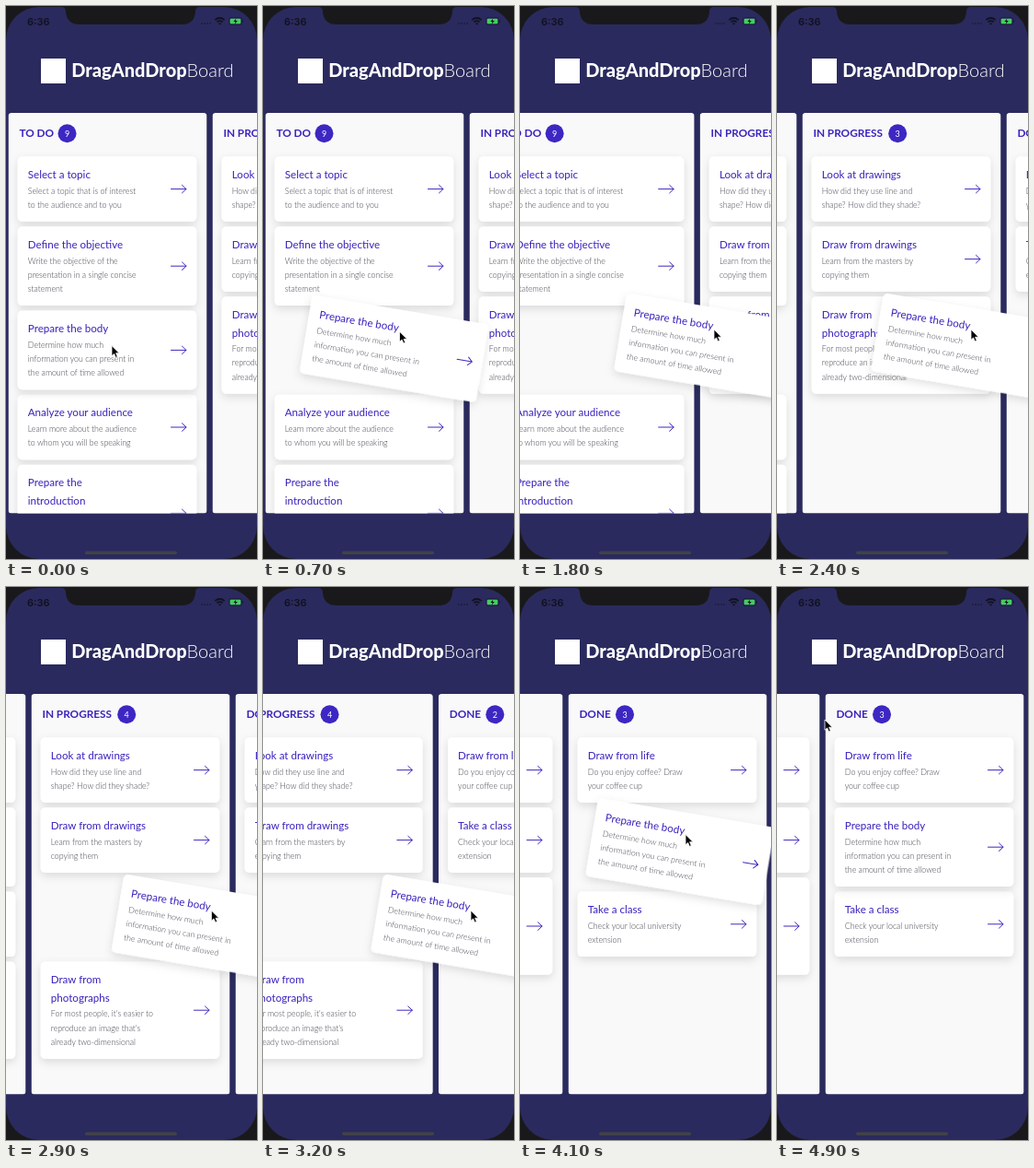
These frames come from a looping animation (273 by 600 pixels, 5000 ms). An HTML page:

```html
<!DOCTYPE html>
<html lang="en">
<head>
<meta charset="utf-8">
<title>Drag and drop board</title>
<style>
  html, body { margin: 0; width: 100%; height: 100%; overflow: hidden; background: #1a1a1c; }
  svg { display: block; width: 100vw; height: 100vh; font-family: Lato, "Open Sans", sans-serif; }
  .brand { font-size: 20px; font-weight: 800; fill: #fff; }
  .brand tspan { font-weight: 300; }
  .head { font-size: 11.8px; font-weight: 700; fill: #3a25bd; }
  .count { font-size: 9px; fill: #fff; text-anchor: middle; }
  .title { font-size: 11.6px; fill: #3a22bd; }
  .desc { font-size: 8.8px; font-weight: 300; fill: #464452; }
  .arrow { fill: none; stroke: #3f28bf; stroke-width: 1; stroke-linecap: round; stroke-linejoin: round; }
  .clock { font: 600 11px Inter, sans-serif; fill: #11111f; }
</style>
</head>
<body>
<svg id="stage" viewBox="0 0 273 600" preserveAspectRatio="none">
  <defs>
    <filter id="soft" x="-20%" y="-30%" width="140%" height="170%">
      <feDropShadow dx="0" dy="3.5" stdDeviation="4.6" flood-color="#000" flood-opacity=".12"/>
    </filter>
    <clipPath id="colClip"><rect y="116" width="216" height="434.5" rx="3"/></clipPath>
  </defs>
  <rect width="273" height="600" fill="#2a2a5e"/>
  <rect x="38" y="57" width="27" height="27" fill="#fff"/>
  <text class="brand" x="71.3" y="76.8">DragAndDrop<tspan>Board</tspan></text>
  <g id="board"></g>
  <g id="held"></g>
  <g id="phone">
    <path fill="#19191b" fill-rule="evenodd" d="M0 0H273V600H0ZM0 37A36 36 0 0 1 36 1H237A36 36 0 0 1 273 37V564A36 36 0 0 1 237 600H36A36 36 0 0 1 0 564Z"/>
    <path fill="#19191b" d="M60 0V1Q65 1 65 6Q66 20 80 20H191Q205 20 206 6Q206 1 211 1V0Z"/>
    <text class="clock" x="23" y="20.5">6:36</text>
    <g fill="#15152c">
      <circle cx="213" cy="19" r=".8"/><circle cx="216" cy="19" r=".8"/>
      <circle cx="219" cy="19" r=".8"/><circle cx="222" cy="19" r=".8"/>
    </g>
    <g fill="none" stroke="#11111f" stroke-width="1.7">
      <path d="M227.4 15.2Q232.5 10.8 237.6 15.2M229.4 17.4Q232.5 14.8 235.6 17.4"/>
      <path d="M231.4 19.3H233.6"/>
    </g>
    <rect x="242.5" y="12.5" width="14" height="8" rx="2.2" fill="none" stroke="#1c1c3c" stroke-width=".7"/>
    <rect x="243.7" y="13.7" width="11.6" height="5.6" rx="1.2" fill="#43cf5c"/>
    <path d="M250.4 13.4L247.4 17H249.4L248.7 19.7L251.8 16.1H249.7Z" fill="#11111f"/>
    <path d="M257.6 15.2V17.8" stroke="#1c1c3c" stroke-width="1"/>
    <rect x="86" y="591.5" width="100" height="3.4" rx="1.7" fill="#424249"/>
  </g>
  <path id="cursor" d="M0 0V11.2L2.6 8.9L4.4 12.9L6.3 12.1L4.6 8.2H8.2Z" fill="#000" stroke="#fff" stroke-width=".8" stroke-linejoin="round"/>
</svg>
<script>
const LOOP = 5000, STEP = 100;
const CARD_W = 194.5, CARD_X = 10.2, FIRST_Y = 163.3, GAP = 5.4;
const COL_X = 2.5, COL_STEP = 222, PAGE = 197, TILT = 9.5;
const GRIP = { x: -6, y: 18.7 };

// Each card: title lines, then description lines.
const columns = [
  { name: "TO DO", badge: 64, count: 8, cards: [
    [["Select a topic"], ["Select a topic that is of interest", "to the audience and to you"]],
    [["Define the objective"], ["Write the objective of the", "presentation in a single concise", "statement"]],
    [["Analyze your audience"], ["Learn more about the audience", "to whom you will be speaking"]],
    [["Prepare the", "introduction"], ["", "", ""]]
  ] },
  { name: "IN PROGRESS", badge: 103.7, count: 3, cards: [
    [["Look at drawings"], ["How did they use line and", "shape? How did they shade?"]],
    [["Draw from drawings"], ["Learn from the masters by", "copying them"]],
    [["Draw from", "photographs"], ["For most people, it's easier to", "reproduce an image that's", "already two-dimensional"]]
  ] },
  { name: "DONE", badge: 61.5, count: 2, cards: [
    [["Draw from life"], ["Do you enjoy coffee? Draw", "your coffee cup"]],
    [["Take a class"], ["Check your local university", "extension"]]
  ] }
];
const movingCard = [["Prepare the body"],
  ["Determine how much", "information you can present in", "the amount of time allowed"]];

// Time, column and index of the open slot.
const slots = [[0, 0, 2], [2500, 1, 2], [3500, 2, 2], [3850, 2, 1]];
const cursorPath = [
  [0, 115, 368.5], [100, 115, 368.5], [350, 115.5, 354.3], [400, 115.5, 354.3],
  [1150, 211, 351], [2500, 211, 351], [3050, 226, 351], [3450, 226, 351],
  [4050, 180, 268.5], [4400, 180, 268.5], [4850, 52, 144]
];

const $ = id => document.getElementById(id);
const clamp = v => Math.max(0, Math.min(1, v));
const mix = (a, b, k) => a + (b - a) * k;
const ramp = (t, from, to) => {
  const k = clamp((t - from) / (to - from));
  return (1 - Math.cos(Math.PI * k)) / 2;
};

function add(parent, tag, attrs, text) {
  const el = document.createElementNS("http://www.w3.org/2000/svg", tag);
  for (const key in attrs) el.setAttribute(key, attrs[key]);
  if (text) el.textContent = text;
  parent.appendChild(el);
  return el;
}
const move = (el, x, y, turn = 0) =>
  el.setAttribute("transform", `translate(${x} ${y}) rotate(${turn})`);

const heightOf = ([titles, lines]) => 40.2 + 15.2 * lines.length + 19.6 * (titles.length - 1);

function makeCard(parent, card) {
  const [titles, lines] = card, h = heightOf(card);
  const g = add(parent, "g", {});
  add(g, "rect", { width: CARD_W, height: h, rx: 5, fill: "#fff", filter: "url(#soft)" });
  titles.forEach((s, i) => add(g, "text", { class: "title", x: 11.1, y: 23.7 + 19.6 * i }, s));
  const top = 40.3 + 19.6 * (titles.length - 1);
  lines.forEach((s, i) => add(g, "text", { class: "desc", x: 11.1, y: top + 15.2 * i }, s));
  add(g, "path", { class: "arrow", d: `M166.8 ${h / 2}h16.5m-4.5 -4.3l4.5 4.3l-4.5 4.3` });
  return g;
}

for (const col of columns) {
  col.el = add($("board"), "g", { "clip-path": "url(#colClip)" });
  add(col.el, "rect", { y: 116, width: 216, height: 434.5, rx: 3, fill: "#f9f9f9" });
  add(col.el, "text", { class: "head", x: 11.9, y: 142.2 }, col.name);
  add(col.el, "circle", { cx: col.badge, cy: 138.3, r: 10, fill: "#3d27c3" });
  col.label = add(col.el, "text", { class: "count", x: col.badge, y: 141.5 });
  col.items = col.cards.map(card => makeCard(col.el, card));
}
const movingH = heightOf(movingCard);
const moving = add($("held"), "g", {});
move(makeCard(moving, movingCard), -CARD_W / 2, -movingH / 2);

function cursorAt(t) {
  let i = 0;
  while (i < cursorPath.length - 2 && t >= cursorPath[i + 1][0]) i++;
  const [t0, x0, y0] = cursorPath[i], [t1, x1, y1] = cursorPath[i + 1];
  const k = ramp(t, t0, t1);
  return { x: mix(x0, x1, k), y: mix(y0, y1, k) };
}

function draw(t) {
  const scroll = PAGE * (ramp(t, 1700, 2100) + ramp(t, 3053, 3453));
  const [, slotCol, slotIndex] = slots.filter(s => t >= s[0]).pop();
  const rest = {};

  columns.forEach((col, c) => {
    const x = COL_X + c * COL_STEP - scroll;
    const open = c === slotCol;
    let y = FIRST_Y;
    move(col.el, x, 0);
    col.label.textContent = col.count + (open ? 1 : 0);
    col.items.forEach((item, i) => {
      if (open && i === slotIndex) y += movingH + GAP;
      move(item, CARD_X, y);
      y += heightOf(col.cards[i]) + GAP;
    });
    if (open) {
      const above = col.cards.slice(0, slotIndex);
      rest.x = x + CARD_X + CARD_W / 2;
      rest.y = above.reduce((sum, card) => sum + heightOf(card) + GAP, FIRST_Y) + movingH / 2;
    }
  });

  const cursor = cursorAt(t);
  const tilt = ramp(t, 400, 520) - ramp(t, 4110, 4190);
  const grip = t < 400 ? 0 : 1 - ramp(t, 4110, 4190);
  move(moving,
    mix(rest.x, cursor.x + GRIP.x, grip),
    mix(rest.y, cursor.y + GRIP.y, grip),
    TILT * tilt);
  move($("cursor"), cursor.x, cursor.y);
}

const start = performance.now();
function tick() {
  const t = (performance.now() - start) % LOOP;
  draw(Math.floor(t / STEP) * STEP);
  requestAnimationFrame(tick);
}
tick();
</script>
</body>
</html>
```
